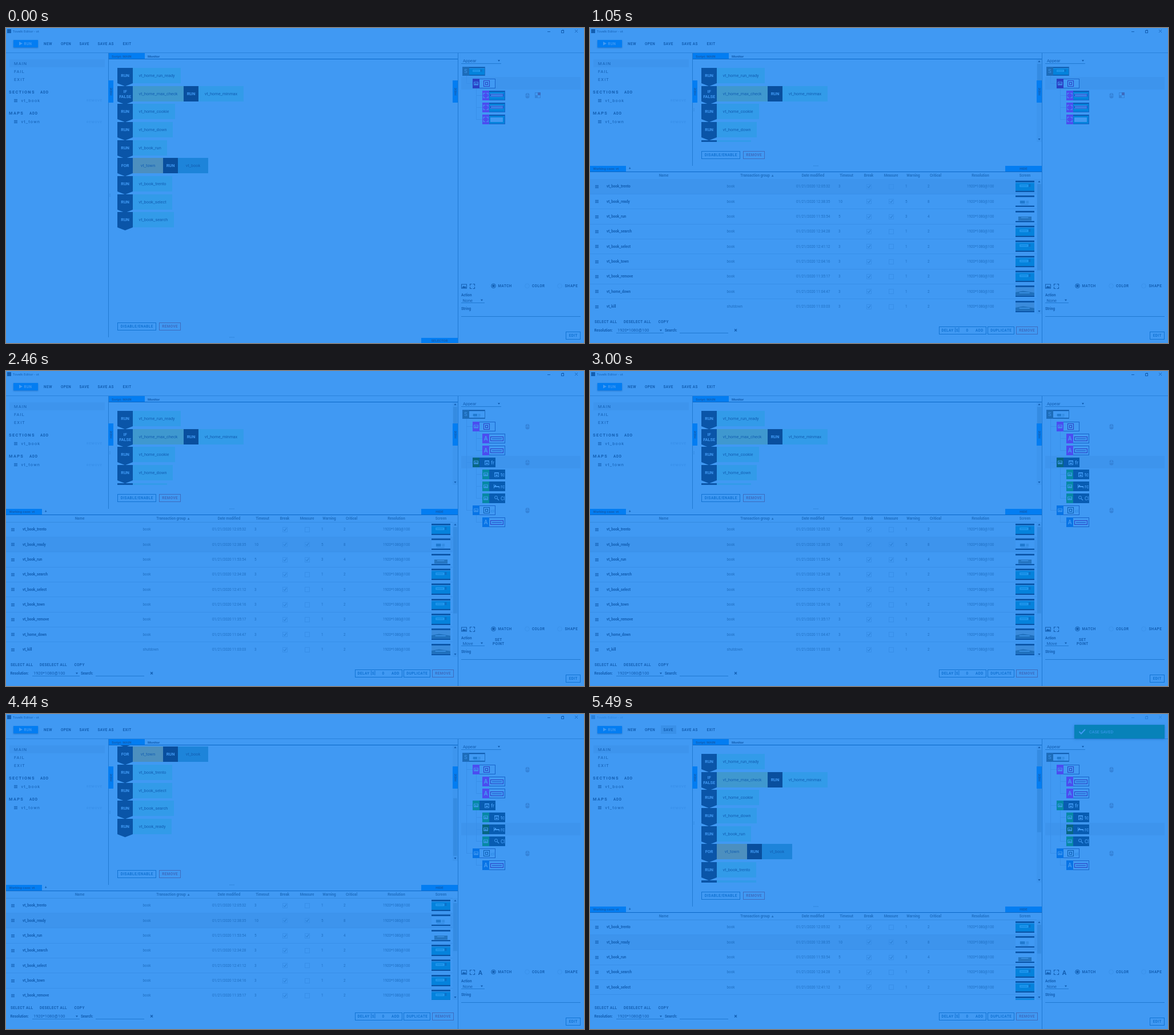
An HTML page with a canvas for the animation above (5.64 s loop, 1012x553 px).

```html
<!DOCTYPE html>
<html lang="en">
<head>
<meta charset="utf-8">
<title>Script editor</title>
<style>
html, body { margin: 0; width: 100%; height: 100%; overflow: hidden; background: #4099f3; }
canvas { display: block; }
</style>
</head>
<body>
<canvas id="stage" width="1012" height="553"></canvas>
<script>
const ctx = document.getElementById('stage').getContext('2d');
const LOOP = 5640, PITCH = 31.65, ROW = 26.35;
const BG = '#4099f3', INK = '#125eb2', SOFT = '#1f6fc2', BLUE = '#037df2', BAND = '#3d94ed',
  BLOCK = '#0a55a8', CYAN = '#329be9', RULE = '#2079d2', FAINT = '#348be2', RED = '#3c6bbe',
  PURPLE = '#4b4df0', VIOLET = '#2a40c4', GREEN = '#0789a6', PINE = '#076684', SEA = '#0482dc',
  NAVY = '#085cb2', LINE = '#388fe9';

const ramp = (t, a, b) => Math.min(1, Math.max(0, (t - a) / (b - a)));
const smooth = p => p * p * (3 - 2 * p);

function box(x, y, w, h, color) {
  ctx.fillStyle = color;
  ctx.fillRect(x, y, w, h);
}
function frame(x, y, w, h, color) {
  ctx.strokeStyle = color;
  ctx.lineWidth = 1;
  ctx.strokeRect(x + .5, y + .5, w - 1, h - 1);
}
function path(points, color, stroke) {
  ctx.beginPath();
  points.forEach(([x, y]) => ctx.lineTo(x, y));
  if (stroke) {
    ctx.strokeStyle = color;
    ctx.lineWidth = stroke;
    ctx.stroke();
  } else {
    ctx.fillStyle = color;
    ctx.fill();
  }
}
function disc(x, y, r, color, stroke) {
  ctx.beginPath();
  ctx.arc(x, y, r, 0, 7);
  ctx[stroke ? 'strokeStyle' : 'fillStyle'] = color;
  ctx.lineWidth = stroke || 1;
  stroke ? ctx.stroke() : ctx.fill();
}
// y is the vertical middle of the capitals
function text(s, x, y, { size = 6.3, weight = 400, color = INK, align = 'left', gap = 0, face = 'Roboto' } = {}) {
  ctx.font = `${weight} ${size}px ${face}, sans-serif`;
  ctx.letterSpacing = gap + 'px';
  ctx.textAlign = align;
  ctx.fillStyle = color;
  ctx.fillText(s, x, y + size * .355);
}
const bold = (s, x, y, o) => text(s, x, y, { weight: 700, ...o });
const caps = (s, x, y, o) => bold(s, x, y, { gap: .45, ...o });
function clipped(x, y, w, h, draw) {
  ctx.save();
  ctx.beginPath();
  ctx.rect(x, y, w, h);
  ctx.clip();
  draw();
  ctx.restore();
}
const arrow = (x, y, r, color = INK) => path([[x - 2 * r, y - r], [x + 2 * r, y - r], [x, y + 2 * r]], color);
function menuIcon(x, y) {
  for (let i = -1; i < 2; i++) box(x, Math.round(y) + i * 2, 6, 1, INK);
}
function button(s, x, y, w, color = '#1273d2') {
  frame(x, y, w, 14, color);
  caps(s, x + w / 2 + .2, y + 7, { align: 'center', color });
}
function scrollbar(top, bottom, content, offset) {
  const view = bottom - top, track = view - 18;
  box(782, top, 9, view, '#3d95ee');
  box(783, top + 9 + track * offset / content, 7, track * view / content, FAINT);
  arrow(786.5, top + 5, -1);
  arrow(786.5, bottom - 5, 1);
}

function header(t) {
  const away = t >= 1500 && t < 1710 || t >= 1980 && t < 2160 || t >= 3630 && t < 3990 || t >= 5040;
  const color = away ? '#2a82dc' : INK;
  box(2, 2, 7, 7, color);
  text('Tovelk Editor - vt', 12, 6, { size: 6, color, face: 'Open Sans' });
  box(948, 6, 5, 1, color);
  frame(972, 4, 5, 5, color);
  path([[973.5, 3.5], [976.5, 3.5], [976.5, 7]], color, .6);
  path([[996, 3], [1001, 8]], color, .8);
  path([[1001, 3], [996, 8]], color, .8);

  ctx.shadowColor = '#0a5cb199';
  ctx.shadowBlur = 2;
  ctx.shadowOffsetY = 1;
  box(13, 21, 43, 13, BLUE);
  ctx.shadowColor = 'transparent';
  path([[23, 24], [29, 27.3], [23, 30.6]], BG);
  caps('RUN', 31.5, 27.5, { color: BG });
  if (t >= 5040) box(124, 20, 27, 15, '#3990e8');
  [['NEW', 66], ['OPEN', 96], ['SAVE', 128.5], ['SAVE AS', 160.5], ['EXIT', 204.5]]
    .forEach(([s, x]) => caps(s, x, 27.5));
  box(0, 43, 1012, 1, '#2a83dd');
}

function sidebar(split) {
  const item = { size: 7.4, gap: 1.15 };
  box(6, 55, 167, 14, BAND);
  ['MAIN', 'FAIL', 'EXIT'].forEach((s, i) => text(s, 14, 62.3 + i * 13.8, item));
  [['SECTIONS', 112.3, 'vt_book', 60], ['MAPS', 149.8, 'vt_town', 41]].forEach(([title, y, name, addX]) => {
    bold(title, 5, y, { size: 7.4, gap: 1.35 });
    caps('ADD', addX, y, { gap: .8 });
    menuIcon(14, y + 14.2);
    text(name, 26.5, y + 14.7, item);
    text('REMOVE', 141, y + 14.7, { size: 6, gap: .7, color: '#348ce6' });
  });
  box(179, 44, 1, split - 44, RULE);
  for (let i = 0; i < 3; i++) box(181, Math.round((43 + split) / 2) - 2 + i * 2, 2, 1, FAINT);
}

const steps = [
  ['RUN', 'vt_home_run_ready'], ['IF FALSE', 'vt_home_max_check', 'vt_home_minmax'], ['RUN', 'vt_home_cookie'],
  ['RUN', 'vt_home_down'], ['RUN', 'vt_book_run'], ['FOR', 'vt_town', 'vt_book'], ['RUN', 'vt_book_trento'],
  ['RUN', 'vt_book_select'], ['RUN', 'vt_book_search'], ['RUN', 'vt_book_ready']
];
function label(s, x, y, color) {
  ctx.font = '400 7.35px Roboto, sans-serif';
  ctx.letterSpacing = '0px';
  const w = Math.round(Math.max(53, ctx.measureText(s).width + 21));
  box(x, y, w, 27, color);
  text(s, x + w / 2, y + 13.5, { size: 7.35, align: 'center' });
  return x + w;
}
function step([kind, name, then], y) {
  const white = { size: 7.35, color: BG, align: 'center' };
  path([[195, y], [222, y], [222, y + 27], [208.5, y + 32.3], [195, y + 27]], BLOCK);
  kind.split(' ').forEach((s, i, all) => bold(s, 208.6, y + 13.8 + (i - (all.length - 1) / 2) * 8.4, white));
  const x = label(name, 222, y, !then ? CYAN : kind === 'FOR' ? '#4c8fbf' : '#3f98cf');
  if (!then) return;
  box(x, y, 26, 27, '#094f9e');
  bold('RUN', x + 13, y + 13.8, white);
  label(then, x + 26, y, kind === 'FOR' ? '#1d84da' : CYAN);
}
function sideTab(x) {
  box(x, 92, 9, 39, BLUE);
  ctx.save();
  ctx.translate(x + 4.5, 111.5);
  ctx.rotate(-Math.PI / 2);
  bold('HIDE', 0, 0, { size: 6, align: 'center' });
  ctx.restore();
}
function script(t, split) {
  const bottom = split - 42, view = bottom - 54;
  const count = t < 3990 ? 9 : 10, content = 58.5 + PITCH * count;
  const offset = Math.max(0, content - view) * (ramp(t, 3120, 3180) - ramp(t, 4680, 4770));
  box(180, 44, 63, 10, BLUE);
  bold('Script: MAIN', 185, 49.5, { size: 6 });
  bold('Monitor', 248, 49.5, { size: 6 });
  box(180, 54, 611, 1, '#0b68c7');
  clipped(180, 55, 611, bottom - 55, () => {
    steps.slice(0, count).forEach((s, i) => step(s, Math.round(70 + i * PITCH - offset)));
    if (content > view) scrollbar(54, bottom, content, offset);
  });
  sideTab(179);
  sideTab(782);
  button('DISABLE/ENABLE', 195, split - 26, 68);
  button('REMOVE', 268, split - 26, 38, RED);
  for (let i = 0; i < 4; i++) box(391 + i * 2.4, split - 1, 1.4, 2, FAINT);
}

// Small screenshot: 'blue' form, 'page', 'photo' or a page with a photo
function shot(x, y, w, h, kind) {
  box(x, y, w, h, kind === 'blue' ? SEA : kind === 'photo' ? '#3a8bdc' : BG);
  if (kind === 'blue') {
    box(x, y + h * .13, w, h * .08, '#2a93ec');
    box(x + w * .22, y + h * .34, w * .46, h * .22, '#279af0');
    box(x + w * .26, y + h * .42, w * .36, h * .06, SEA);
    box(x + w * .7, y + h * .3, w * .1, h * .24, '#0d70c8');
  } else if (kind === 'page') {
    box(x + w * .24, y + h * .46, w * .26, h * .24, '#1f79cf');
    box(x + w * .56, y + h * .46, w * .14, h * .24, '#338ce3');
    box(x + w * .28, y + h * .76, w * .4, h * .06, '#3089e2');
  } else if (kind === 'photo') {
    path([[x, y + h * .6], [x + w * .4, y + h * .48], [x + w, y + h * .64], [x + w, y + h * .88], [x, y + h * .88]], '#1f70bd');
    box(x + w * .2, y + h * .6, w * .55, h * .09, '#3a91e4');
  } else {
    box(x + w * .15, y + h * .5, w * .7, h * .36, '#2475c2');
    box(x + w * .3, y + h * .56, w * .38, h * .08, '#3a91e4');
  }
  box(x, y, w, h * .14, BLOCK);
  box(x, y + h * .89, w, h * .11, BLOCK);
}

const cases = [
  ['vt_book_trento', '12:05:32', 3, 1, 2, 'blue'], ['vt_book_ready', '12:38:35', 10, 5, 8, 'page'],
  ['vt_book_run', '11:53:54', 5, 3, 4, 'mixed'], ['vt_book_search', '12:34:28', 3, 1, 2, 'blue'],
  ['vt_book_select', '12:41:12', 3, 1, 2, 'blue'], ['vt_book_town', '12:04:16', 3, 1, 2, 'blue'],
  ['vt_book_remove', '11:35:17', 3, 1, 2, 'blue'], ['vt_home_down', '11:04:47', 3, 1, 2, 'photo'],
  ['vt_kill', '11:03:03', 3, 1, 2, 'photo']
];
function check(x, y, on) {
  frame(x - 4, y - 4, 9, 9, '#378ee8');
  if (on) path([[x - 2, y + .5], [x, y + 2.5], [x + 3, y - 2]], SOFT, .8);
}
function caseRow([name, time, timeout, warning, critical, kind], y, selected) {
  if (selected) box(0, y - 13, 782, 26, BAND);
  menuIcon(9, y);
  bold(name, 29, y);
  const cell = (s, x) => text(s, x, y, { color: SOFT });
  cell(name === 'vt_kill' ? 'shutdown' : 'book', 239.5);
  cell('01/21/2020 ' + time, 361);
  cell(timeout, 435);
  check(488, Math.round(y), true);
  check(527, Math.round(y), warning > 1);
  cell(warning, 552);
  cell(critical, 591);
  cell('1920*1080@100', 660);
  shot(745, Math.round(y - 10), 33, 20, kind);
  box(0, Math.round(y + 13), 782, 1, LINE);
}
function selector(t, split) {
  if (t < 120) {
    box(727, 544, 64, 9, BLUE);
    bold('SELECTOR', 759, 548.8, { size: 6, align: 'center' });
    return;
  }
  const top = split + 23;
  box(0, split, 63, 10, BLUE);
  box(727, split, 64, 10, BLUE);
  box(0, split + 10, 791, 1, '#0b68c7');
  bold('Working case: vt', 5.5, split + 5.2, { size: 6 });
  bold('+', 68, split + 5.2);
  bold('HIDE', 759, split + 5.2, { size: 6, align: 'center' });
  [['Name', 129], ['Transaction group ▲', 293], ['Date modified', 390.5], ['Timeout', 449], ['Break', 488],
    ['Measure', 527], ['Warning', 566], ['Critical', 605], ['Resolution', 683.5], ['Screen', 761.5]]
    .forEach(([s, x]) => bold(s, x, split + 17, { align: 'center', color: SOFT }));
  box(0, top, 791, 1, FAINT);
  clipped(0, top, 791, 502 - top, () => {
    cases.forEach((c, i) => caseRow(c, split + 36 + i * ROW, i === (t < 1500 ? 0 : 1)));
    scrollbar(top, 502, 13 * ROW, 0);
  });

  caps('SELECT ALL', 8, 515.3);
  caps('DESELECT ALL', 59, 515.3);
  caps('COPY', 119.5, 515.3);
  bold('Resolution:', 7.5, 531);
  text('1920*1080@100', 48, 530.8, { size: 7.4 });
  arrow(124, 530.5, 1);
  box(46, 535, 83, 1, RULE);
  bold('Search:', 131, 531);
  box(157, 535, 85, 1, RULE);
  path([[253, 528.5], [257, 532.5]], INK, 1.2);
  path([[257, 528.5], [253, 532.5]], INK, 1.2);
  frame(611, 524, 83, 14, '#1273d2');
  [['DELAY [S]', 615.5], ['0', 658.5], ['ADD', 675]].forEach(([s, x]) => caps(s, x, 531.2, { color: '#1273d2' }));
  button('DUPLICATE', 696, 524, 47);
  button('REMOVE', 746, 524, 38, RED);
}

function picture(x, y, r, color) {
  frame(x - r, y - r + 1, r * 2, r * 2 - 2, color);
  path([[x - r + 1, y + r - 2], [x - 1, y - 1], [x + .5, y + 1], [x + 2, y - .5], [x + r - 1, y + r - 2]], color);
}
function corners(x, y, r, color) {
  for (const a of [-1, 1]) for (const b of [-1, 1])
    path([[x + a * r, y + b], [x + a * r, y + b * r], [x + a, y + b * r]], color, 1.2);
}
const letter = (x, y, r, color) => bold('A', x, y, { size: r * 2.5, align: 'center', color });

// [icon, level, colour, selected colour, crop, caption, mouse]
const firstTree = [
  [picture, 1, PURPLE, VIOLET, 'square'], [corners, 2, PURPLE, VIOLET, 'field', '', 1],
  [corners, 2, PURPLE, VIOLET, 'field'], [corners, 2, PURPLE, VIOLET, 'page']
];
const secondTree = [
  [picture, 1, PURPLE, VIOLET, 'square', '', 1], [letter, 2, PURPLE, VIOLET, 'outline'], [letter, 2, PURPLE, VIOLET, 'outline'],
  [picture, 1, GREEN, PINE, 'dark', 'fr', 1], [picture, 2, GREEN, PINE, 'dark', 'tc'],
  [picture, 2, GREEN, PINE, 'dark', 'rc'], [picture, 2, GREEN, PINE, 'dark', 'Cl'],
  [picture, 1, '#0874e6', BLOCK, 'square', 'cl', 1], [letter, 2, '#0874e6', BLOCK, 'outline']
];
function glyph(s, x, y) {
  if (s === 'rc') {
    box(x - 4, y, 9, 2, BG);
    box(x - 5, y - 3, 1, 7, BG);
    box(x + 4, y, 1, 4, BG);
    box(x - 3, y - 2, 2, 2, BG);
  } else if (s === 'Cl') {
    disc(x - 1, y - 1, 2.5, BG, 1);
    path([[x + 1, y + 1], [x + 4, y + 4]], BG, 1.2);
  } else {
    frame(x - 4, y - 3, 8, 8, BG);
    box(x - 4, y - 3, 8, 2, BG);
    box(x - 2, y + 1, 4, 2, BG);
  }
}
function crop(kind, caption, x, y) {
  const edge = kind === 'square' && caption ? '#0a5cb1' : VIOLET;
  if (kind === 'dark') {
    box(x, y, 28, 17, NAVY);
    glyph(caption, x + 13, y + 8);
    clipped(x, y, 28, 17, () => text(caption, x + 20, y + 9, { size: 8.5, weight: 500, color: BG }));
    return;
  }
  if (kind === 'field' || kind === 'page') {
    box(x, y, 28, 17, SEA);
    box(x, y, 28, 2, BLOCK);
    box(x + 2, y + 5, 22, kind === 'page' ? 8 : 6, BG);
    if (kind === 'field') frame(x + 2, y + 6, 23, 4, VIOLET);
    return;
  }
  box(x, y, 28, 17, BG);
  if (kind === 'outline') {
    frame(x + 2, y + 5, 23, 8, edge);
    box(x + 5, y + 8, 17, 2, '#2d73dc');
  } else {
    frame(x + 7, y + 3, 11, 11, edge);
    frame(x + 10, y + 6, 5, 5, edge);
    if (caption) text(caption, x + 20, y + 9, { size: 8, color: '#2385e0' });
  }
}
function mouse(x, y) {
  ctx.beginPath();
  ctx.roundRect(x - 3.5, y - 4.5, 7, 9.5, 3.5);
  ctx.fillStyle = '#3483d9';
  ctx.fill();
  box(x - .5, y - 4, 1, 4, BG);
  box(x - 3.5, y, 7, .8, BG);
}
function tree(t, selected) {
  const nodes = t < 1500 ? firstTree : secondTree;
  box(797, 86 + selected * 21, 209, 22, BAND);
  box(799, 68, 12, 16, '#1c6cb9');
  text('S', 805, 76.3, { size: 9, align: 'center', color: BG });
  shot(811, 68, 28, 16, t < 1500 ? 'blue' : 'page');
  frame(799, 68, 40, 16, SOFT);
  let parentY = 76;
  nodes.forEach(([icon, level, color, active, kind, caption, hasMouse], i) => {
    const y = 97 + i * 21, x = level === 1 ? 817 : 834, stem = x - 11;
    const from = level === 1 ? 84 : parentY + 9;
    box(stem, from, 1, y - from, LINE);
    box(stem, y, 11, 1, LINE);
    if (level === 1) parentY = y;
    crop(kind, caption, x + 12, y - 8);
    frame(x, y - 8, 40, 17, kind === 'dark' ? NAVY : '#1764ca');
    box(x, y - 8, 12, 17, i === selected ? active : color);
    icon(x + 6, y + .5, 4, BG);
    if (hasMouse) mouse(913, y + .5);
  });
  if (t < 1500) {
    frame(926, 113, 10, 10, '#3483d9');
    box(926, 118, 5, 5, '#3483d9');
    box(931, 113, 5, 5, RED);
  }
}
function inspector(t) {
  const selected = t < 2100 ? 0 : t < 2460 ? 5 : t < 4140 ? 3 : 5;
  const moves = t >= 1500 && selected !== 5;
  box(791, 44, 1, 509, RULE);
  text('Appear', 800, 57.5, { size: 7.4 });
  arrow(863, 57, 1);
  box(797, 62, 70, 1, RULE);
  tree(t, selected);

  picture(802, 453.5, 5, INK);
  corners(816.5, 453.5, 4, INK);
  if (selected === 5) letter(830.5, 454, 4.4, INK);
  [['MATCH', 853.5, 861.5], ['COLOR', 912.5, 921], ['SHAPE', 969.5, 978.5]].forEach(([s, cx, x], i) => {
    disc(cx, 452.8, 3.8, i ? '#3a92eb' : INK, 1);
    if (!i) disc(cx, 452.8, 2.3, INK);
    caps(s, x, 453, { gap: .5 });
  });
  bold('Action', 797, 468.7);
  text(moves ? 'Move' : 'None', 799.5, 478, { size: 7.4 });
  arrow(833, 477.5, 1);
  box(797, 482, 41, 1, RULE);
  if (moves) ['SET', 'POINT'].forEach((s, i) => caps(s, 862.3, 471.3 + i * 7.2, { align: 'center' }));
  bold('String', 797, 492.5);
  box(797, 506, 209, 1, RULE);
  button('EDIT', 980, 533, 26);
}

function toast(t) {
  const p = 1 - (1 - ramp(t, 5190, 5460)) ** 3;
  if (!p) return;
  ctx.save();
  ctx.globalAlpha = p;
  ctx.translate((1 - p) * 160, 0);
  ctx.shadowColor = '#0a5cb188';
  ctx.shadowBlur = 4;
  ctx.shadowOffsetY = 1;
  box(848, 19, 158, 24, '#0782b9');
  ctx.shadowColor = 'transparent';
  path([[856.5, 31], [860, 34.5], [867, 27]], BG, 2);
  text('CASE SAVED', 874, 31, { size: 7.3, color: BG });
  ctx.restore();
}

function draw(now) {
  const t = now % LOOP;
  const split = t < 120 ? 543 : Math.round(393 - 151 * smooth(ramp(t, 600, 1020))
    + 96 * (1 - (1 - ramp(t, 4350, 4530)) ** 1.3));
  box(0, 0, 1012, 553, BG);
  header(t);
  sidebar(split);
  script(t, split);
  selector(t, split);
  inspector(t);
  toast(t);
  requestAnimationFrame(draw);
}
requestAnimationFrame(draw);
</script>
</body>
</html>
```
